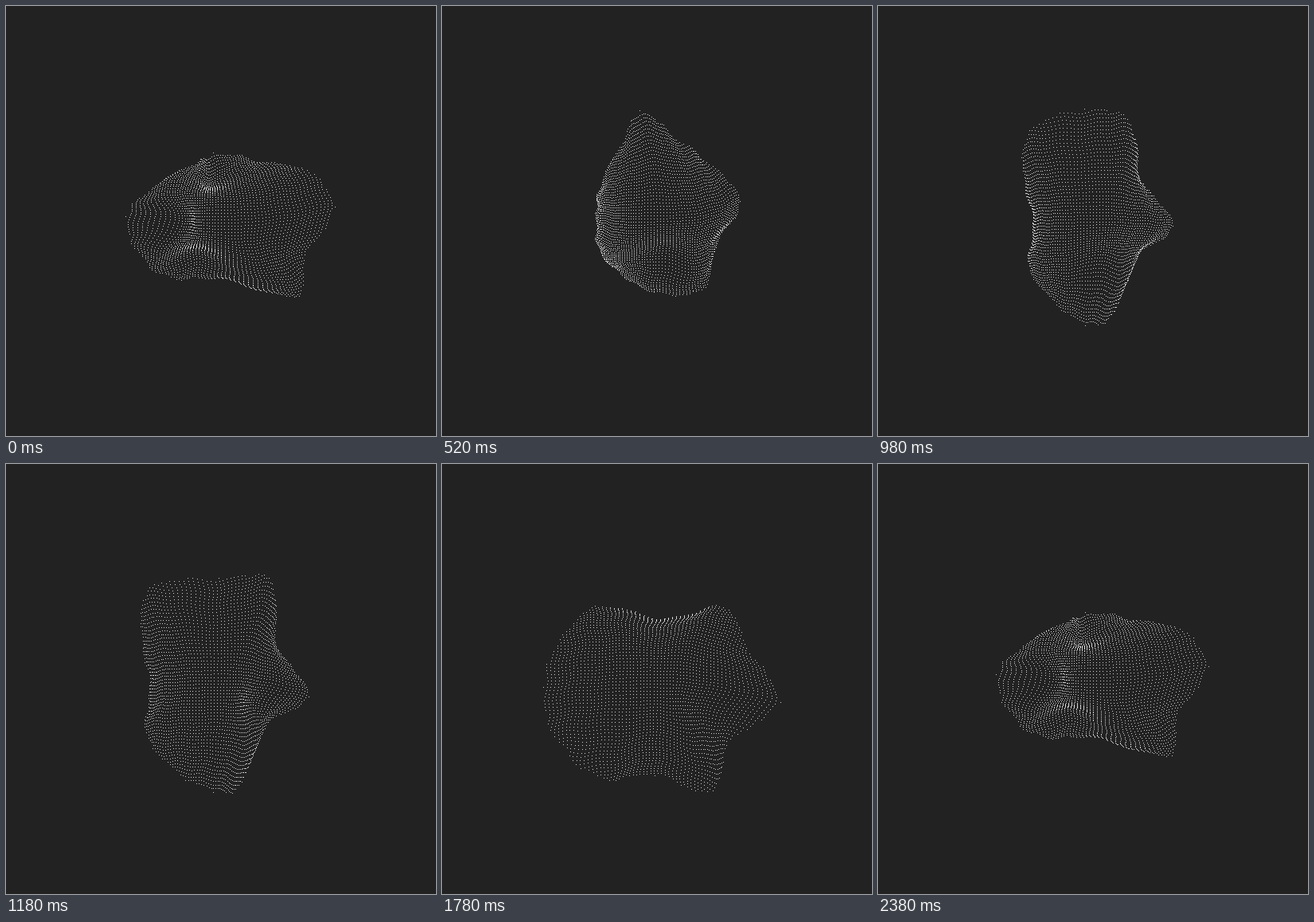
Animation, 540 px wide and 540 px high, one loop 2.4 s. Source, as an HTML page with a canvas:

```html
<!DOCTYPE html>
<html lang="en">
<head>
<meta charset="utf-8">
<title>Drifting dot sheet</title>
<style>
  html, body { margin: 0; width: 100%; height: 100%; overflow: hidden; background: #222; }
  canvas { display: block; width: 540px; height: 540px; }
</style>
</head>
<body>
<canvas id="stage" width="540" height="540"></canvas>
<script>
const LOOP = 2400, STEP = 20, SIZE = 540, TAU = Math.PI * 2;
const CELLS = 32, RADIUS = 135, FALLOFF = 2.2;
const ctx = document.getElementById('stage').getContext('2d');

// The rim is led by evenly spaced anchors, clockwise from the right.
// Each one circles its rest point: rest radius, cosine swing x y, sine swing x y.
const anchors = [
  [133, 15, -21, -27, -25],
  [100, 23, -8, -11, -27],
  [130, 36, -20, -10, -26],
  [106, 6, -33, -2, -11],
  [109, 0, -19, 13, -27],
  [109, -4, -14, 28, -18],
  [104, -17, -8, 36, -9],
  [105, 6, 10, 24, 2],
  [113, 27, 21, 10, -5],
  [111, -4, 17, -16, -34],
  [118, -10, 24, -31, -11],
  [109, 17, -12, -27, -17]
];

// Soft pushes that crease the sheet: place on the disc, shift, phase in turns.
const pushes = [
  { u: -0.62, v: 0, dx: 34, dy: 0, at: 0.03 },
  { u: -0.1, v: -0.7, dx: 0, dy: 26, at: 0 },
  { u: -0.25, v: 0.6, dx: 0, dy: -30, at: 0.05 },
  { u: 0.1, v: 0.45, dx: 0, dy: -25, at: 0.3 },
  { u: 0.55, v: 0.15, dx: -28, dy: 0, at: 0.58 }
];

// Each anchor as offset from the plain disc, then its two swings.
const rim = anchors.map(([r, ...swing], i) => {
  const a = i * TAU / anchors.length;
  return [(r - RADIUS) * Math.cos(a), (r - RADIUS) * Math.sin(a), ...swing];
});

// Smooth closed curve through the rim values.
function rimAt(angle) {
  const n = rim.length, pos = (angle / TAU + 1) % 1 * n;
  const i = Math.floor(pos), s = pos - i;
  const [a, b, c, d] = [-1, 0, 1, 2].map(k => rim[(i + k + n) % n]);
  return b.map((p, j) => p + s / 2 * (c[j] - a[j] +
    s * (2 * a[j] - 5 * p + 4 * c[j] - d[j] + s * (3 * (p - c[j]) + d[j] - a[j]))));
}

function makeDot(u, v) {
  const r = Math.hypot(u, v), k = r ** FALLOFF;
  const [x, y, ...swing] = rimAt(Math.atan2(v, u)).map(n => n * k);
  return {
    u, v, swing,
    x: 270 - 5 * k + RADIUS * u + x,
    y: 272 + RADIUS * v + y,
    wave: 1.5 * r * r,
    pull: pushes.map(p => Math.exp(-12 * ((u - p.u) ** 2 + (v - p.v) ** 2)))
  };
}

// A square grid of dots cut to a disc.
const dots = [];
for (let j = -CELLS; j <= CELLS; j++) {
  for (let i = -CELLS; i <= CELLS; i++) {
    if (i * i + j * j <= CELLS * CELLS) dots.push(makeDot(i / CELLS, j / CELLS));
  }
}

function draw(t) {
  const phase = TAU * t / LOOP, c = Math.cos(phase), s = Math.sin(phase);
  const power = pushes.map(p => Math.max(0, Math.cos(phase - TAU * p.at)) ** 2);
  ctx.fillStyle = '#222';
  ctx.fillRect(0, 0, SIZE, SIZE);
  ctx.fillStyle = 'rgba(255,255,255,.78)';
  for (const d of dots) {
    const [cx, cy, sx, sy] = d.swing;
    let x = d.x + c * cx + s * sx + d.wave * Math.sin(20 * d.v + 3 * d.u + s);
    let y = d.y + c * cy + s * sy + d.wave * Math.sin(20 * d.u + 3 * d.v + c);
    pushes.forEach((p, i) => {
      x += p.dx * power[i] * d.pull[i];
      y += p.dy * power[i] * d.pull[i];
    });
    ctx.fillRect(Math.round(x), Math.round(y), 1, 1);
  }
}

const start = performance.now();
function tick() {
  const t = (performance.now() - start) % LOOP;
  draw(Math.floor(t / STEP) * STEP);
  requestAnimationFrame(tick);
}
tick();
</script>
</body>
</html>
```
